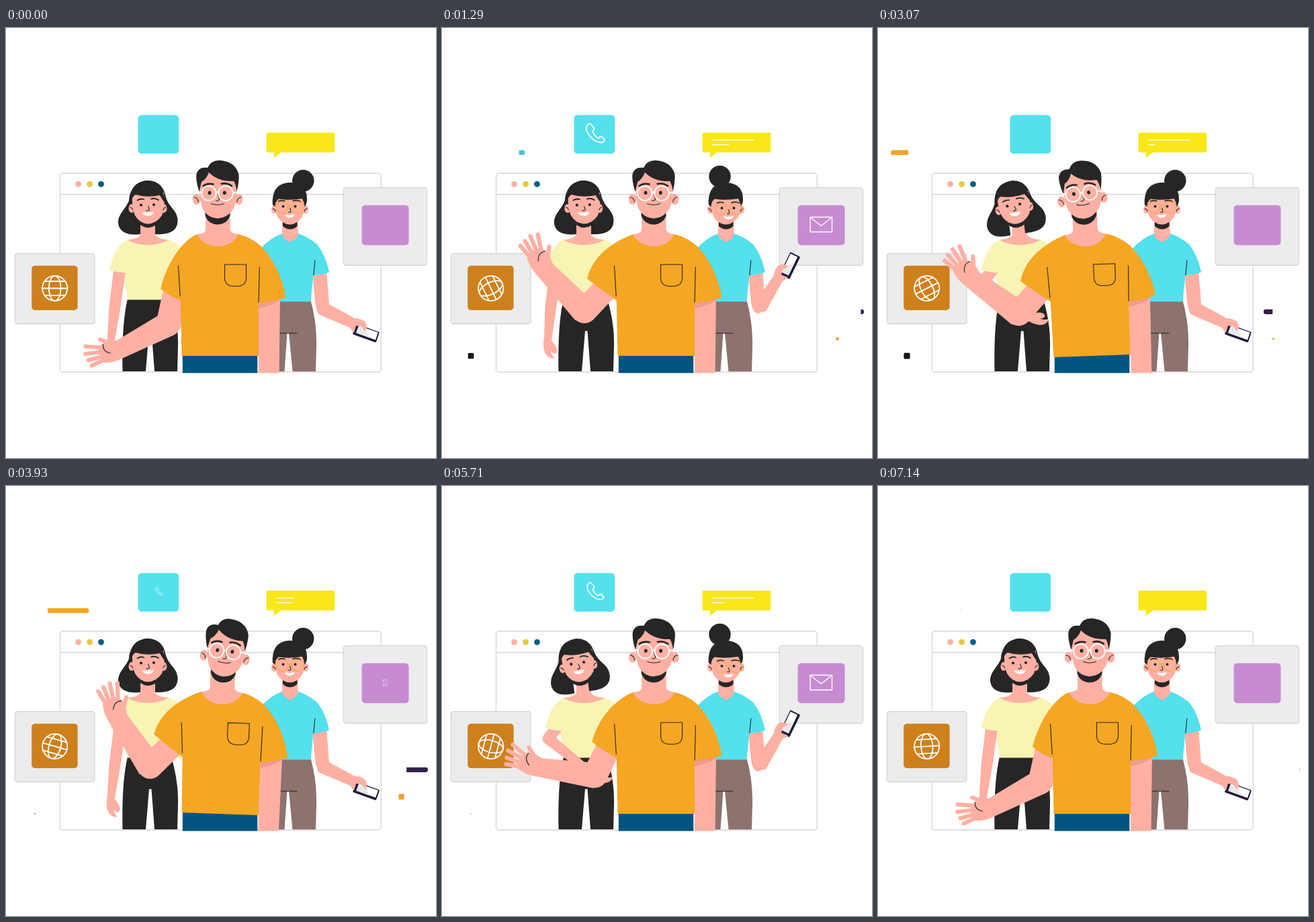
Animation, 640 px wide and 640 px high, one loop 7.21 s. Source, as an HTML page:

```html
<!DOCTYPE html>
<html lang="en">
<head>
<meta charset="utf-8">
<title>Team</title>
<style>
  html, body { margin: 0; height: 100%; overflow: hidden; background: #fff; }
  svg { display: block; width: 100vw; height: 100vh; }
  .skin { fill: #ffb0a3; }
  .dark { fill: #262626; }
  .line { fill: none; stroke: #262626; stroke-width: 1.1; stroke-linecap: round; stroke-linejoin: round; }
  .brow { fill: none; stroke: #262626; stroke-width: 1.8; stroke-linecap: round; }
  .white { fill: none; stroke: #fff; stroke-width: 1.8; stroke-linecap: round; stroke-linejoin: round; }
  .panel { fill: #ececec; stroke: #d9d6d6; stroke-width: 1.4; }
  .frame { fill: #fff; stroke: #d9d6d6; stroke-width: 1.4; }
  .shirt { fill: #f5a623; }
  .cyan { fill: #55e0ee; }
  .cream { fill: #f8f4b4; }
  .fingers { fill: none; stroke: #ffb0a3; stroke-width: 6; stroke-linecap: round; stroke-linejoin: round; }
</style>
</head>
<body>
<svg viewBox="0 0 640 640">
  <clipPath id="floor"><rect width="640" height="513.5"/></clipPath>
  <clipPath id="clipLeft"><rect x="19" y="181.8" width="104.5" height="7.2" rx="3.6"/></clipPath>
  <clipPath id="clipRight"><rect x="573.8" y="418.8" width="54.2" height="7.2" rx="3.4"/></clipPath>

  <!-- browser window -->
  <rect class="frame" x="80.5" y="216.2" width="477.8" height="295.8" rx="4"/>
  <path d="M80.5 247.8H558.3" stroke="#d9d6d6" stroke-width="1.4"/>
  <circle cx="107.5" cy="232.3" r="4.4" fill="#ffb0a3"/>
  <circle cx="124.6" cy="232.3" r="4.4" fill="#e5c940"/>
  <circle cx="141.5" cy="232.3" r="4.4" fill="#005f80"/>

  <!-- cards -->
  <rect class="panel" x="13.4" y="335.7" width="118.4" height="104.6" rx="3.5"/>
  <rect x="38.2" y="353.7" width="68.4" height="66.3" rx="5" fill="#ce801c"/>
  <g id="globe" class="white">
    <circle cx="72.7" cy="387.5" r="18.6"/>
    <ellipse cx="72.7" cy="387.5" rx="8.8" ry="18.6"/>
    <path d="M54 387.5H91.3M57.5 377H88M57.5 398H88"/>
  </g>
  <rect class="panel" x="502.3" y="237.6" width="124.2" height="115.6" rx="3.5"/>
  <rect x="529.5" y="263.8" width="70" height="59.4" rx="5" fill="#c78bd2"/>
  <path id="mail" class="white" style="stroke-width:1.4" d="M548 281.5H580.5V303.5H548ZM548.5 282L564.3 294.5L580 282"/>
  <rect class="cyan" x="196.5" y="129.5" width="60.8" height="57.5" rx="5.5"/>
  <path id="phoneIcon" class="white" d="M215 147Q218 142 221 142.500L226.500 149Q227 151 224 154Q227 161 233 164Q236 160.500 238 161.500L242 166Q241 170 237 170.500Q228 170 221 162Q213.500 154 215 147Z"/>
  <path d="M390 155.800H487q2.400 0 2.400 2.400V182.800q0 2.400-2.400 2.400H409L398.800 193.500V185.200H390q-2.400 0-2.400-2.400V158.200q0-2.400 2.400-2.400z" fill="#f9e71a"/>
  <rect id="text1" x="402" y="166" height="1.3" fill="#fff"/>
  <rect id="text2" x="402" y="173" height="1.3" fill="#fff"/>

  <!-- accents -->
  <g clip-path="url(#clipLeft)"><rect id="barLeft" y="181" height="9"/></g>
  <g clip-path="url(#clipRight)"><rect id="barRight" y="418" height="9"/></g>
  <rect id="dotBlack" rx="1.500" fill="#161320"/>
  <rect id="dotOrange" rx="1.500" fill="#f5a12e"/>

  <g clip-path="url(#floor)">
    <!-- woman with long hair -->
    <path class="dark" d="M181 403H246Q257 440 256 474L255 511H221L216.500 451H213L208 511H173.500Q172 440 181 403Z"/>
    <path class="cream" d="M181 315Q211 308 242 315Q262 322 275 345V404.500H181L175 362Z"/>
    <path id="hipArm" class="skin"/>
    <path id="hipHand" class="skin" d="M-6-2Q-8 16 0 23Q6 27 9.500 25Q5 21 4.500 14Q9 20 12 18Q16 14 10 4L5-2Z"/>
    <path class="cream" d="M181 315Q160 326 154 360.500Q166 364 177.500 364.500L186 335Z"/>
    <path class="skin" d="M181 315.500Q196 314 200 308H222Q226 314 242 315.500Q228 323 211 323Q194 323 181 315.500Z"/>
    <path class="skin" d="M200 280H222V313H200Z"/>
    <g id="head1">
      <path class="dark" d="M211 227C194 228 184 240 183 257C178 270 167 276 167 290C168 304 181 309 200 307V285H222V307C246 308 256 301 255.500 285C254 270 243 268 238 252C235 236 226 227 211 227Z"/>
      <path class="dark" d="M200 286H222V294Q211 301 200 293Z"/>
      <ellipse class="skin" cx="187" cy="268.500" rx="4.500" ry="6.500"/>
      <ellipse class="skin" cx="235" cy="268.500" rx="4.500" ry="6.500"/>
      <path class="skin" d="M188 245H235Q237 268 232 279Q224 291 211 291.500Q199 291 192 279Q187 268 188 245Z"/>
      <path class="dark" d="M185 257Q184 229 211 227Q233 228 238 262Q234 258 229 249Q209 253 193 248Q188 250 185 262Z"/>
      <path class="brow" d="M195.500 256.500Q200 253.500 205 255M216 254.500Q221 252.500 227 256"/>
      <circle class="dark" cx="201" cy="263.500" r="2.100"/>
      <circle class="dark" cx="220" cy="263" r="2.100"/>
      <path class="line" d="M211.500 265L213.500 270.500Q212 272.500 209 271.500M184.500 267Q187.500 267 188.500 271M238 267Q235 267 234 271"/>
      <path d="M202 274.500Q211 275.500 219.500 273.800Q218 279.800 211 279.800Q204.500 279.500 202 274.500Z" fill="#fff"/>
    </g>

    <!-- woman with bun -->
    <path d="M395 405H453.500Q463 440 462 475L461 511.200H426.500L421 454H418.500L414.500 511.200H395Z" fill="#8d726e"/>
    <path class="line" d="M404 454.200H433"/>
    <path class="skin" d="M457 360H477L481 412Q478 424 470 425Q464 424 461 414Q457 388 457 360Z"/>
    <g id="foreArm2">
      <path class="skin" d="M475 408L519 432L512 446L465 426Q460 414 466 407Z"/>
      <g transform="rotate(20 536 454)">
        <rect x="517.500" y="446" width="37" height="16.500" rx="1.600" fill="#211c3b"/>
        <rect x="522" y="447.300" width="30.500" height="11.500" fill="#fff"/>
        <path d="M522 447.300H532L543 458.800H522Z" fill="#e9e7ea"/>
      </g>
      <path class="skin" d="M510 440Q511 432 522 432Q535 434 536.500 442Q537 450 534 451Q531 449 530 444.500L521 443L518 453Q512 449 510 440Z"/>
    </g>
    <path class="cyan" d="M412 305.500Q395 311 378 329L370 407.300H453.500L457.500 368Q470 367.500 481 363.500Q476 338 463 322Q450 311 434 305.500Z"/>
    <path class="line" d="M459.800 346L457.800 367.500"/>
    <path class="skin" d="M411 284H434.500V306.500Q436 311 423 319Q410 312 411 306.500Z"/>
    <path class="dark" d="M412 286H433.500V295Q423 304 412 295Z"/>
    <circle id="bun" class="dark" r="16.200"/>
    <ellipse class="skin" cx="399.500" cy="270" rx="4.500" ry="6.200"/>
    <ellipse class="skin" cx="445.500" cy="270" rx="4.500" ry="6.200"/>
    <path class="skin" d="M401 250H444Q446 270 441 281Q434 292 422.500 292.500Q411 292 404 281Q399 268 401 250Z"/>
    <path class="dark" d="M396.800 263Q395 231 422.500 230Q449 231 448 257Q447 263 444.500 266Q444 260 441 254Q420 257 406 254.500Q401 257 400.500 266Z"/>
    <path class="line" d="M397 269Q400 269 401 273M448 269Q445 269 444 273"/>
    <g id="face2">
      <path class="brow" d="M405.500 258Q410 256 415 257.500M427 257.500Q432 255.500 438 258"/>
      <circle class="dark" cx="412.500" cy="265.500" r="2"/>
      <circle class="dark" cx="430.500" cy="265.500" r="2"/>
      <path class="line" d="M422.500 268L424 273.500Q423 275 420.500 274"/>
      <g fill="none" stroke="#efae3c" stroke-width="1.2"><circle cx="411.300" cy="267" r="8.600"/><circle cx="434.300" cy="267" r="8.600"/><path d="M419.900 266Q422.800 263.500 425.700 266"/></g>
      <path d="M415 277.800Q422 279 429.500 277.300Q428 282.500 422.500 282.500Q417 282.500 415 277.800Z" fill="#fff"/>
    </g>

    <!-- man -->
    <rect x="262.800" y="483" width="111.500" height="31" fill="#005580"/>
    <g id="body">
      <path class="skin" d="M376 395H408L406.500 520H376Z"/>
      <path d="M376 407L408.500 402V404.500Q396 414 376 417Z" fill="#f09b90"/>
      <path id="upperArm" class="skin"/>
      <g id="foreArm">
        <path class="skin" d="M234 423.500L160 468L168 494L251 456.500Q264 440 252 426Z"/>
        <path class="skin" d="M166 465L152 466Q140 470 138 480Q138 492 146 498Q158 499 170 493Z"/>
        <path class="fingers" d="M156 470L140 463.500M146 476L118.500 474M144 482L118 485M146 488L122.500 494.500M150 492L127.500 502.500"/>
        <path class="line" d="M144.500 470.500Q143.500 481.500 155.500 484"/>
      </g>
      <path id="sleeve" class="shirt"/>
      <path class="shirt" d="M284 307Q314 318 346 307Q364 311 380 325Q408 355 416.500 401Q396 408 376 409V488H261.500L258.500 350Z"/>
      <path class="line" d="M256.500 354L259.200 399M377.300 356L376 408M325.500 352H357.500V372Q357 384 345 384.200H338Q326 384 325.500 372Z"/>
      <path class="skin" d="M284 307Q297 306 297 300V270H333.500V300Q335 306 346 307Q336 325 315 325Q293 324 284 307Z"/>
      <g id="head">
        <path class="dark" d="M296.500 270H333.500V279Q329 292 315 292.500Q301 292 296.500 279Z"/>
        <ellipse class="skin" cx="283.500" cy="255" rx="5.800" ry="8"/>
        <ellipse class="skin" cx="346.500" cy="255" rx="5.800" ry="8"/>
        <path class="skin" d="M290 216H340L343.500 230Q345 258 338 270Q329 283 315 283.500Q301 283 293 270Q287 255 288 230Z"/>
        <path class="dark" d="M287.500 244Q282 226 283.500 217Q287 206 300 208Q305 197 317 197Q341 198 346.500 218Q347 230 343.500 243Q342 232 339 228Q316 229 302 215Q298 225 291 229Z"/>
        <path class="line" d="M280 252Q285 252 286.500 259M350 252Q345 252 343.500 259"/>
        <path class="brow" style="stroke-width:2.6" d="M293.500 235Q300 230.500 308.500 232.500M320.500 232Q329 230 336 235"/>
        <ellipse id="eyeL" class="dark" cx="303" cy="245.300" rx="2.500"/>
        <ellipse id="eyeR" class="dark" cx="325.300" cy="245.300" rx="2.500"/>
        <path class="line" d="M315.500 248L317.500 255Q316 258 312.500 257M305.500 261.500Q315 265 324.500 261.500"/>
        <g class="white"><circle cx="301.800" cy="246" r="10.800"/><circle cx="327" cy="246" r="10.800"/><path d="M312.500 245Q314.500 243 316.300 245M291 245L287 244M338 245H343"/></g>
      </g>
    </g>
  </g>
</svg>
<script>
  const LOOP = 7210, STEP = LOOP / 101, HALF = LOOP / 2, BAR = LOOP / 5;
  const set = (id, attrs) => { for (const k in attrs) document.getElementById(id).setAttribute(k, attrs[k]); };
  const move = (id, transform) => set(id, { transform });
  const mix = (a, b, p) => a + (b - a) * p;
  const mixPt = (a, b, p) => a.map((v, i) => mix(v, b[i], p));

  // Smooth step from 0 to 1 between two times.
  function ease(t, from, to) {
    const p = Math.min(1, Math.max(0, (t - from) / (to - from)));
    return p * p * (3 - 2 * p);
  }

  // Rises from a to b, holds, then falls from c to d.
  const pulse = (t, a, b, c, d) => ease(t, a, b) - ease(t, c, d);

  // Rounded limb that narrows from radius r1 to r2.
  function limb([x1, y1], r1, [x2, y2], r2) {
    const len = Math.hypot(x2 - x1, y2 - y1), nx = (y1 - y2) / len, ny = (x2 - x1) / len;
    return `M${x1 + nx * r1} ${y1 + ny * r1}L${x2 + nx * r2} ${y2 + ny * r2}` +
      `A${r2} ${r2} 0 0 0 ${x2 - nx * r2} ${y2 - ny * r2}L${x1 - nx * r1} ${y1 - ny * r1}` +
      `A${r1} ${r1} 0 0 0 ${x1 + nx * r1} ${y1 + ny * r1}Z`;
  }

  function wipe(id, t, x, width, color) {
    const c = t % BAR, tail = ease(c, 760, 1400), head = ease(c, 0, 570);
    set(id, { x: x + width * tail, width: width * Math.max(0, head - tail), fill: color });
  }

  function dot(id, x, y, s) {
    set(id, { x: x - s / 2, y: y - s / 2, width: s, height: s });
  }

  function pop(id, x, y, scale, angle = 0) {
    move(id, `translate(${x} ${y}) rotate(${angle}) scale(${scale}) translate(${-x} ${-y})`);
  }

  function drawMan(t) {
    const raise = pulse(t, 150, 1050, 5250, 6150);
    const sway = (from, peak, to) => pulse(t, from, peak, peak, to);
    const lean = 2 * (sway(1250, 2150, 2610) - sway(2610, 3070, 3500) + sway(3500, 3930, 5900));
    const elbow = mixPt([242, 440], [212, 421], raise);
    const [hx, hy] = mixPt([230, 388], [216, 373], raise);
    move('body', `rotate(${lean} 318 490)`);
    move('head', `rotate(${lean * 2} 315 290)`);
    set('upperArm', { d: limb([mix(254, 246, raise), 385], 18.5, elbow, 18.5) });
    move('foreArm', `translate(${elbow}) rotate(${74 * raise + 4 * lean}) scale(${1 + 0.04 * raise}) translate(-242 -440)`);
    set('sleeve', { d: `M284 307C${mix(260, 256, raise)} 318 ${hx + 9} ${hy - 36} ${hx} ${hy}Q${hx + 16} ${hy + 13} 259.5 405L300 360Z` });
    const ry = 2.8 - 2.2 * pulse(t, 6150, 6250, 6340, 6440);
    set('eyeL', { ry });
    set('eyeR', { ry });
  }

  function drawWomen(t) {
    const hip = pulse(t, 1240, 1800, 3200, 3800) + pulse(t, 4300, 4950, 6350, 7000);
    const elbow = mixPt([162, 415], [158, 376], hip), wrist = mixPt([156, 467], [227, 431], hip);
    move('head1', `translate(${-6.5 * hip} 0) rotate(${-8 * hip} 212 280)`);
    set('hipArm', { d: limb([169, 362], 9, elbow, 8.5) + limb(elbow, 8.5, wrist, 5.5) });
    move('hipHand', `translate(${wrist}) rotate(${-65 * hip})`);

    const look = pulse(t % HALF, 300, 1000, 2250, 2850);
    move('foreArm2', `rotate(${-84 * look} 471 414)`);
    set('bun', { cx: mix(442.3, 413.5, look), cy: mix(227.3, 221, look) });
    move('face2', `translate(${4 * look} ${2.5 * look})`);
  }

  function drawAccents(t) {
    const h = t % HALF, line = t % (LOOP / 3), turn = Math.floor(t / BAR);
    move('globe', `rotate(${360 * t / LOOP} 72.7 387.5)`);
    pop('phoneIcon', 228, 157, pulse(h, 150, 550, 2000, 2550));
    pop('mail', 564.3, 292.5, pulse(h, 150, 650, 2550, 3000), 120 * ease(h, 150, 750) - 120 + 30 * ease(h, 2500, 3000));
    set('text1', { width: 62 * pulse(line, 0, 550, 1280, 1720) });
    set('text2', { width: 25 * pulse(line, 200, 1250, 1500, 1900) });
    wipe('barLeft', t, 19, 104.5, turn ? '#f5a623' : '#4ac6de');
    wipe('barRight', t, 573.8, 54.2, turn === 3 ? '#f5a623' : '#33214d');
    dot('dotBlack', 43, 488, 11 * pulse(t % (LOOP / 4), 220, 650, 1130, 1650));
    dot('dotOrange', 588.5, 462.5, 8.5 * pulse(t % (LOOP / 10), 80, 340, 450, 690));
  }

  const start = performance.now();
  function tick() {
    const now = (performance.now() - start) % LOOP;
    const t = Math.min(100, Math.floor(now / STEP + 0.1)) * STEP;
    drawMan(t);
    drawWomen(t);
    drawAccents(t);
    requestAnimationFrame(tick);
  }
  tick();
</script>
</body>
</html>
```
